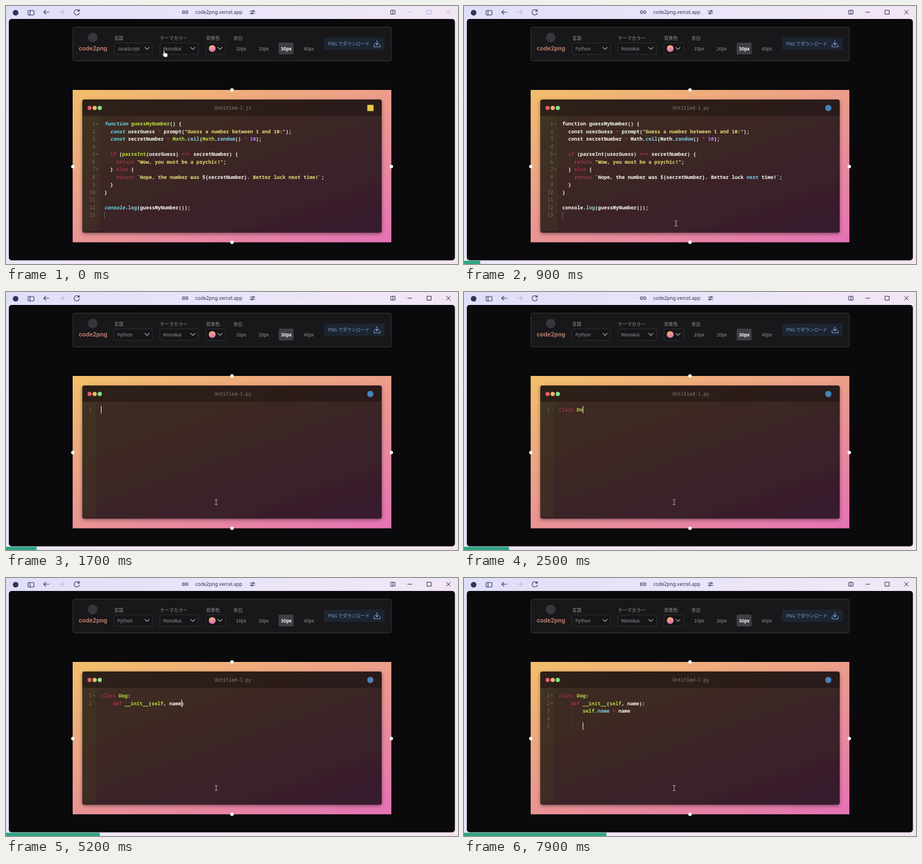
Animation, 800 px wide and 458 px high, one loop 8 s. Source, as an HTML page:

```html
<!DOCTYPE html>
<html lang="ja">
<head>
<meta charset="utf-8">
<style>
html, body { margin: 0; width: 100%; height: 100%; overflow: hidden; background: #0a090c; }
svg { display: block; width: 800px; height: 458px; }
text { white-space: pre; }
.ui { font: 8.1px "Noto Sans CJK JP", "Noto Sans", sans-serif; fill: #98979b; }
.code { font: 600 8.78px "Noto Sans Mono", monospace; fill: #f8f8f2; }
.num { font: 8.78px "Noto Sans Mono", monospace; fill: #756b5f; text-anchor: end; }
.mid { text-anchor: middle; }
.line { fill: none; stroke-linecap: round; stroke-linejoin: round; }
.y { fill: #e6db74; }
.i { fill: #66d9ef; font-style: italic; }
.g { fill: #b5dc3c; }
.c { fill: #7fcde0; }
.r { fill: #d52d65; font-weight: 500; }
.p { fill: #ae81ff; }
</style>
</head>
<body>
<svg viewBox="0 0 800 458">
  <defs>
    <linearGradient id="frame" x2="1" y2="0.6">
      <stop stop-color="#dfdff8"/><stop offset=".55" stop-color="#eee6f8"/><stop offset="1" stop-color="#f5e5ee"/>
    </linearGradient>
    <linearGradient id="sunset" gradientUnits="userSpaceOnUse" x1="324" y1="74" x2="476" y2="494">
      <stop stop-color="#f2bf69"/><stop offset="1" stop-color="#e472b5"/>
    </linearGradient>
    <linearGradient id="pane" gradientUnits="userSpaceOnUse" x1="345" y1="130" x2="455" y2="440">
      <stop stop-color="#3d2d20"/><stop offset="1" stop-color="#391d2d"/>
    </linearGradient>
    <linearGradient id="swatch" x2=".3" y2="1">
      <stop stop-color="#f2b96b"/><stop offset="1" stop-color="#e573b4"/>
    </linearGradient>
    <filter id="shadow" x="-5%" y="-10%" width="110%" height="120%">
      <feDropShadow dx="0" dy="2" stdDeviation="3" flood-opacity=".4"/>
    </filter>
  </defs>

  <!-- browser window -->
  <rect width="800" height="458" fill="url(#frame)"/>
  <rect x="5" y="23" width="789.5" height="428.5" rx="5" fill="#0a090c"/>
  <circle cx="17" cy="12" r="5" fill="#34325c"/>
  <g class="line" stroke="#34325c" stroke-width="1.1">
    <rect x="39" y="8" width="10.5" height="8" rx="1.5"/><path d="M42.5 8v8"/>
    <path d="M76 11H67m3.5-3.7L66.800 11l3.700 3.700"/>
    <path d="M94 11h9m-3.500-3.700L103.200 11l-3.700 3.700" stroke="#b9b6d3"/>
    <path d="M129.300 9a4.700 4.700 0 1 0 .4 3.500M129.800 6v3.200h-3.200"/>
    <path d="M316 8.500h-1.500a2.400 2.400 0 0 0 0 4.800h1.500m2-4.800h1.500a2.400 2.400 0 0 1 0 4.800H318m-3-2.400h4"/>
    <path d="M432 9h4m3 0h1.500M432 13h1.500m3 0h4"/>
    <circle cx="437.500" cy="9" r="1.300"/><circle cx="435" cy="13" r="1.300"/>
    <rect x="681" y="7.500" width="7.500" height="7" rx="1"/><path d="M684.800 7.500v7"/>
  </g>
  <path id="controls" class="line" d="M711 11h7M745.500 7.500h7v7h-7zM779.500 7.500l7 7m0-7l-7 7"/>
  <text x="335" y="13.500" style="font:8.5px 'Noto Sans',sans-serif" fill="#302e54">code2png.vercel.app</text>

  <!-- toolbar -->
  <rect x="118.500" y="37.500" width="563.500" height="60" rx="3" fill="#18171a" stroke="#39383c"/>
  <circle cx="153.500" cy="56" r="8.500" fill="#37363a"/>
  <text class="mid" x="154" y="79" style="font:700 10.2px Inter,sans-serif" fill="#b97a6b">code2png</text>
  <g class="ui">
    <text x="191.500" y="60">言語</text><text x="272.500" y="60">テーマカラー</text>
    <text x="354" y="60">背景色</text><text x="402.500" y="60">余白</text>
    <g fill="#161518" stroke="#302f33">
      <rect x="191.500" y="65.500" width="67.500" height="20.500" rx="2"/>
      <rect x="272.500" y="65.500" width="68" height="20.500" rx="2"/>
      <rect x="354" y="65.500" width="34.500" height="20.500" rx="2"/>
    </g>
    <text id="language" x="197" y="78.500"></text><text x="278" y="78.500">Monokai</text>
    <circle cx="365" cy="75.500" r="6" fill="url(#swatch)"/>
    <path class="line" stroke="#aaa9ad" stroke-width="1.200" d="M246 73.500l3.700 3.700 3.700-3.700M327 73.500l3.700 3.700 3.700-3.700M375 73.500l3.700 3.700 3.700-3.700"/>
    <rect x="482.500" y="65" width="26.500" height="21" rx="2.500" fill="#3f3e42"/>
    <text class="mid" x="416" y="78.500">10px</text><text class="mid" x="456" y="78.500">20px</text>
    <text class="mid" x="496" y="78.500" fill="#fff" font-weight="700" style="fill:#fff">30px</text>
    <text class="mid" x="536" y="78.500">40px</text>
    <rect x="563" y="56" width="107" height="22" rx="2.500" fill="#1d2531"/>
    <text x="570" y="70" style="fill:#7d9fd6;font-size:7.9px">PNG でダウンロード</text>
    <path class="line" stroke="#7d9fd6" stroke-width="1.200" d="M656.500 61.500v7.500m-3-3l3 3 3-3M651.500 68.500v4h10.500v-4"/>
  </g>

  <!-- canvas and editor -->
  <rect x="118" y="149" width="564" height="270.500" fill="url(#sunset)"/>
  <rect x="135" y="166" width="530" height="236.500" rx="4" fill="url(#pane)" filter="url(#shadow)"/>
  <path d="M135 195v-25a4 4 0 0 1 4-4h522a4 4 0 0 1 4 4v25z" fill="#150e0a" fill-opacity=".42"/>
  <rect id="gutter" x="135" y="195" height="204" fill="#4a4a24" fill-opacity=".24"/>
  <circle cx="148" cy="181" r="3.700" fill="#e85d69"/>
  <circle cx="157" cy="181" r="3.700" fill="#efb865"/>
  <circle cx="166" cy="181" r="3.700" fill="#80e58a"/>
  <text id="title" class="mid" x="401.500" y="183.700" style="font:8.33px 'Noto Sans Mono',monospace" fill="#8b8078"></text>
  <rect id="badgeJs" x="639.500" y="175.500" width="11" height="11" fill="#e9ca46"/>
  <circle id="badgePy" cx="644.800" cy="181" r="5.500" fill="#4584b6"/>
  <g id="editor"></g>
  <g fill="#fff">
    <circle cx="400" cy="149" r="3"/><circle cx="400" cy="419.500" r="3"/>
    <circle cx="118.300" cy="285" r="3"/><circle cx="682" cy="285" r="3"/>
  </g>

  <path id="hand" fill="#fff" stroke="#222" stroke-width=".7" stroke-linejoin="round"
    d="M-2.200-4.500q1-1.200 2 0V-.5q1-1 2 .2q1-.7 1.700.3q1.300-.4 1.500.9V4q-.2 1.700-1 2.700H-1.200Q-2.500 4-4.300 2q-.2-1.500 1.200-1l.9.900z"/>
  <path id="beam" class="line" stroke="#b9b1b0" d="M-2-4.500h1.300L0-4l.7-.5H2M0-4v8M-2 4.500h1.300L0 4l.7.500H2"/>
  <rect id="progress" y="452.300" height="5.700" fill="#2ca683"/>
</svg>

<script>
const LOOP = 8000, STEP = 100, CHAR = 5.268, LINE = 13.5;
const SWITCH = 500, SELECT = 1300, CLEAR = 1700;
const el = id => document.getElementById(id);

const START = `function guessMyNumber() {
  const userGuess = prompt("Guess a number between 1 and 10:");
  const secretNumber = Math.ceil(Math.random() * 10);

  if (parseInt(userGuess) === secretNumber) {
    return "Wow, you must be a psychic!";
  } else {
    return \`Nope, the number was \${secretNumber}. Better luck next time!\`;
  }
}

console.log(guessMyNumber());
`;

// start time, time per character, text
const TYPING = [
  [1800, 100, "class Dog:"],
  [2850, 0, "\n    "],
  [3000, 100, "def __init__(self, name):"],
  [5700, 0, "\n        "],
  [6200, 100, "self"],
  [6700, 80, ".name = name"],
  [7700, 0, "\n        "],
  [7800, 0, "\n        "]
];

// time, x, y
const POINTER = [
  [0, 281, 84], [200, 228, 78], [500, 228, 78], [900, 375, 386], [1200, 372, 373]
];

const SYNTAX = {
  js: /(?<y>"[^"]*"|`[^`$]*|(?<=\})[^`]+`)|(?<i>\b(?:function|const|console)\b)|(?<g>\b(?:parseInt|Math)\b|(?<=function )\w+)|(?<c>(?<=\.)\w+)|(?<r>\b(?:if|else|return)\b|=+|\*)|(?<p>\b\d+)/g,
  py: /(?<y>"[^"]*")|(?<r>\b(?:class|def|if|else|return)\b|=+|\*)|(?<g>\bself\b|(?<=class |def )\w+)|(?<c>(?<=\.)\w+|\bnext\b)|(?<p>\b\d+)/g
};

const escapeXml = s => s.replace(/&/g, "&amp;").replace(/</g, "&lt;");

function highlight(line, syntax) {
  return escapeXml(line).replace(SYNTAX[syntax], (token, ...rest) => {
    const groups = rest[rest.length - 1];
    const name = Object.keys(groups).find(key => groups[key] !== undefined);
    return `<tspan class="${name}">${token}</tspan>`;
  });
}

function typedText(t) {
  return TYPING.map(([start, pace, text]) => {
    if (t < start) return "";
    return pace ? text.slice(0, Math.floor((t - start) / pace) + 1) : text;
  }).join("");
}

function pointerAt(t) {
  const next = POINTER.findIndex(p => p[0] > t);
  if (next < 0) return POINTER[POINTER.length - 1].slice(1);
  const [t0, x0, y0] = POINTER[next - 1], [t1, x1, y1] = POINTER[next];
  const k = (t - t0) / (t1 - t0), ease = k * k * (3 - 2 * k);
  return [x0 + (x1 - x0) * ease, y0 + (y1 - y0) * ease];
}

function drawEditor(t, syntax) {
  const fresh = t >= CLEAR;
  const text = fresh ? typedText(t) : START;
  const before = text.split("\n");
  const row = before.length - 1;
  const column = before[row].length;
  const openBracket = text.lastIndexOf("(") > text.lastIndexOf(")");
  const lines = (openBracket ? text + ")" : text).split("\n");
  const left = fresh ? 168 : 174;
  let out = "";

  if (!fresh && t >= SELECT)
    out += `<rect x="174" y="202" width="491" height="${12 * LINE}" fill="#47463c"/>`;
  lines.forEach((line, i) => {
    const y = 212 + i * LINE;
    out += `<text class="num" x="${left - 16}" y="${y}">${i + 1}</text>`;
    if (/[{:]$/.test(line))
      out += `<path d="M${left - 14.5} ${y - 4}h4l-2 2.300z" fill="#756b5f"/>`;
    if (fresh && line.startsWith("        "))
      out += `<path d="M${left + 4 * CHAR + .4} ${y - 10}v${LINE}" stroke="#4b3a34" stroke-width=".8"/>`;
    out += `<text class="code" x="${left}" y="${y}">${highlight(line, syntax)}</text>`;
  });

  const focused = t >= SELECT;
  out += `<rect x="${left + column * CHAR}" y="${202.3 + row * LINE}" width="1" height="13.300" fill="${focused ? "#f8f8f0" : "#66585a"}"/>`;
  el("editor").innerHTML = out;
  el("gutter").setAttribute("width", fresh ? 24.5 : 30.5);
}

function render(t) {
  const syntax = t < SWITCH ? "js" : "py";
  el("language").textContent = syntax === "js" ? "JavaScript" : "Python";
  el("title").textContent = "Untitled-1." + syntax;
  el("badgeJs").style.display = syntax === "js" ? "" : "none";
  el("badgePy").style.display = syntax === "py" ? "" : "none";
  el("controls").setAttribute("stroke", t < STEP ? "#aab4e6" : "#28264a");
  drawEditor(t, syntax);

  const [x, y] = pointerAt(t), overCode = y > 195;
  for (const id of ["hand", "beam"]) {
    el(id).setAttribute("transform", `translate(${x} ${y})`);
    el(id).style.display = (id === "beam") === overCode ? "" : "none";
  }
  el("progress").setAttribute("width", t * 0.0319);
}

let shown = -1;
function tick(now) {
  const t = Math.floor((now % LOOP) / STEP) * STEP;
  if (t !== shown) render(shown = t);
  requestAnimationFrame(tick);
}
render(0);
requestAnimationFrame(tick);
</script>
</body>
</html>
```
